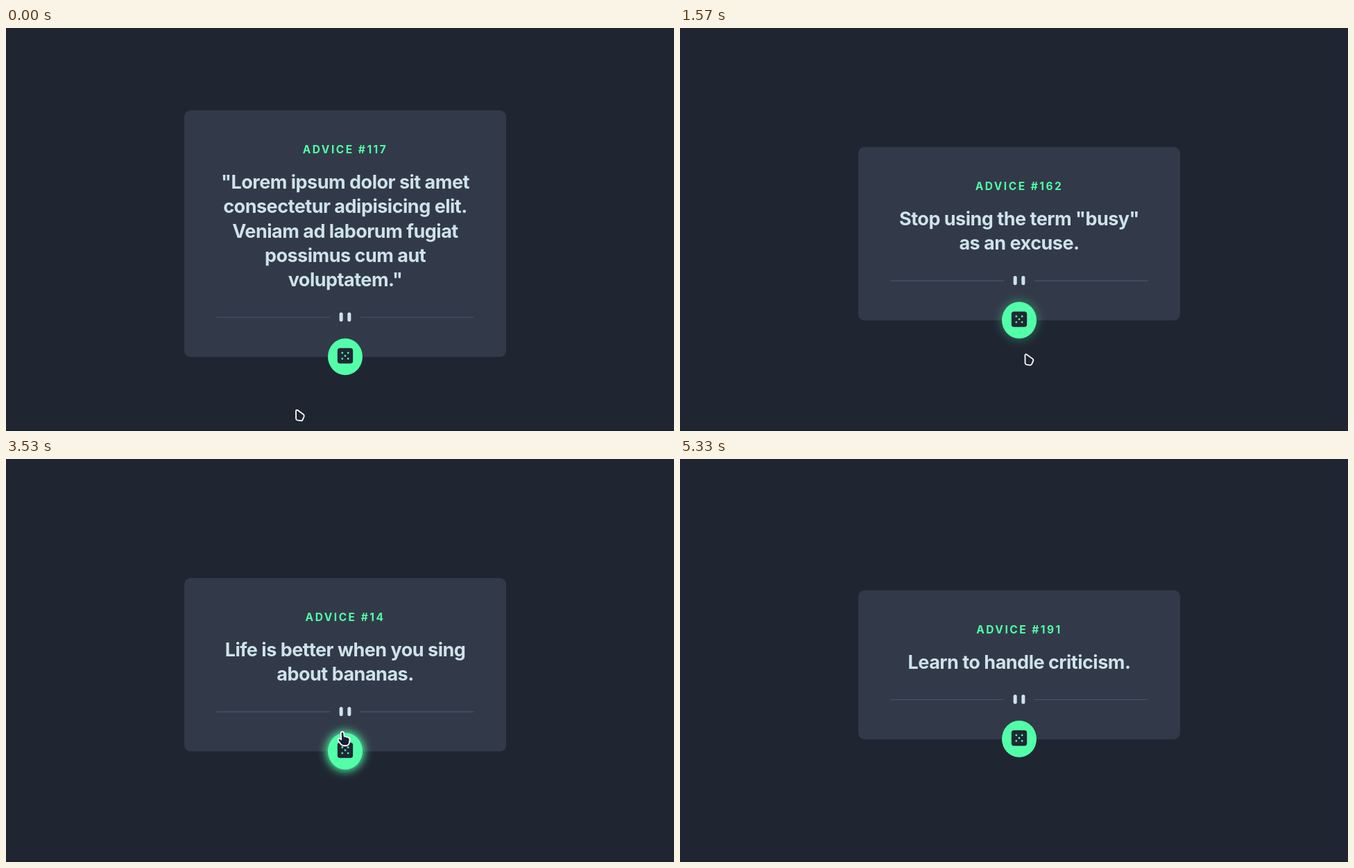
Animation of 963x582 px, one loop 5870 ms. Source, as an HTML page:

```html
<!DOCTYPE html>
<html lang="en">
<head>
<meta charset="utf-8">
<title>Advice generator</title>
<style>
  html, body { margin: 0; width: 100%; height: 100%; overflow: hidden; background: #1f2632; }
  svg { display: block; }
  text { font-family: Inter, sans-serif; font-weight: 700; text-anchor: middle; white-space: pre; }
  #title { font-size: 15.5px; letter-spacing: 2.5px; fill: #52ffa8; }
  #quote { font-size: 27px; letter-spacing: -.5px; fill: #cee3e9; }
  #glow { filter: blur(6.5px); }
  #cursor path { stroke: #fff; stroke-width: 1.8; stroke-linejoin: round; }
</style>
</head>
<body>
<svg width="963" height="582" viewBox="0 0 963 582">
  <rect y="580" width="963" height="2" fill="#1c222d"/>
  <rect id="card" x="257" width="464" rx="9" fill="#323a49"/>
  <g id="header">
    <text id="title" x="489" y="62.2"></text>
    <g id="quote"></g>
  </g>
  <!-- Positioned from the lower edge of the card -->
  <g id="footer">
    <g transform="translate(303.5 -64.4) scale(.8356)">
      <path fill="#4f5d74" d="M0 8h196v1H0zM248 8h196v1H248z"/>
      <g fill="#cee3e9">
        <rect x="212" width="6" height="16" rx="3"/>
        <rect x="226" width="6" height="16" rx="3"/>
      </g>
    </g>
    <g transform="translate(489 -.4)" fill="#52ffa8">
      <ellipse id="glow" rx="27" ry="28.5"/>
      <ellipse rx="25" ry="26.5"/>
      <g transform="translate(0 -1.3) scale(.93)">
        <rect x="-12" y="-12" width="24" height="24" rx="4" fill="#202733"/>
        <path fill="none" stroke="#52ffa8" stroke-width="3" stroke-linecap="round"
          d="M0 0h0M-4.5-4.5h0M4.5-4.5h0M-4.5 4.5h0M4.5 4.5h0"/>
      </g>
    </g>
  </g>
  <g id="cursor">
    <path id="arrow" fill="#1f2632" d="M1 2Q1.4 0 3.2 .8L11.8 7Q13.5 8.5 12.6 10.5L10.5 15Q9.8 16.4 8 16.2L3 15.4Q1.2 15 1.1 13.2Z"/>
    <path id="hand" fill="#172033" d="M-2.3 3.2a2.2 2.2 0 0 1 4.4-.3L2.6 7.4L8 8.8Q11 9.8 10.6 13L9.6 17.8Q8.5 21 5.5 21H2Q-1 21-2.6 18.5L-6 13.8Q-7.2 11.6-5.4 10.8Q-4 10.4-1.7 12.2Z"/>
  </g>
</svg>
<script>
const LOOP = 5870, STEP = 70, FADE = 200, FADE_SAMPLES = 10;
const LINE_HEIGHT = 35.2, CENTER_Y = 297.1;

const slides = [
  { from: 0, id: 117, lines: ['"Lorem ipsum dolor sit amet', 'consectetur adipisicing elit.',
    'Veniam ad laborum fugiat', 'possimus cum aut', 'voluptatem."'] },
  { from: 1430, id: 162, lines: ['Stop using the term "busy"', 'as an excuse.'] },
  { from: 2520, id: 59, lines: ['Don’t be afraid of silly ideas.'] },
  { from: 3530, id: 14, lines: ['Life is better when you sing', 'about bananas.'] },
  { from: 4630, id: 191, lines: ['Learn to handle criticism.'] },
];

const pointerStart = { x: 417, y: 551 };
const pointerMoves = [
  { from: 0, to: 560, x: 491, y: 472 },
  { from: 630, to: 960, x: 503, y: 457 },
  { from: 1150, to: 1360, x: 497, y: 475 },
  { from: 1430, to: 2190, x: 491, y: 426 },
  { from: 2720, to: 3070, x: 485, y: 393 },
  { from: 3530, to: 3800, x: 484, y: 384 },
  { from: 3800, to: 4300, x: 493, y: 419 },
  { from: 4700, to: 5330, x: 885, y: 590 },
];

const $ = id => document.getElementById(id);
const place = (id, x, y) => $(id).setAttribute('transform', `translate(${x} ${y})`);
const ease = k => k * k * (3 - 2 * k);
const slideAt = t => slides.findLast(s => s.from <= t);
const cardHeight = slide => 180 + slide.lines.length * LINE_HEIGHT;
let shown;

function showSlide(slide) {
  if (slide === shown) return;
  shown = slide;
  const height = cardHeight(slide), top = CENTER_Y - height / 2;
  $('card').setAttribute('y', top);
  $('card').setAttribute('height', height);
  place('header', 0, top);
  place('footer', 0, top + height);
  $('title').textContent = `ADVICE #${slide.id}`;
  $('quote').innerHTML = slide.lines.map((line, i) =>
    `<text x="489" y="${113.2 + i * LINE_HEIGHT}">${line}</text>`).join('');
}

function pointerAt(t) {
  let { x, y } = pointerStart;
  for (const move of pointerMoves.filter(m => m.from <= t)) {
    const elapsed = Math.floor((t - move.from) / STEP) * STEP;
    const k = t >= move.to ? 1 : ease(elapsed / (move.to - move.from));
    x += (move.x - x) * k;
    y += (move.y - y) * k;
  }
  return { x, y };
}

function hoverAt(t) {
  const time = Math.max(0, t), { x, y } = pointerAt(time);
  const buttonY = CENTER_Y + cardHeight(slideAt(time)) / 2 - .4;
  return Math.hypot((x - 489) / 25, (y - buttonY) / 26.5) < 1;
}

// The fade is the share of the last FADE ms spent over the button.
function glowAt(t) {
  let hits = 0;
  for (let i = 1; i <= FADE_SAMPLES; i++) hits += hoverAt(t - i * FADE / FADE_SAMPLES);
  return hits / FADE_SAMPLES;
}

function draw(now) {
  const t = now % LOOP, pointer = pointerAt(t);
  const hovering = hoverAt(t - STEP);
  showSlide(slideAt(t));
  $('glow').setAttribute('opacity', glowAt(t));
  place('cursor', pointer.x, pointer.y);
  $('hand').style.display = hovering ? '' : 'none';
  $('arrow').style.display = hovering ? 'none' : '';
  requestAnimationFrame(draw);
}
draw(performance.now());
</script>
</body>
</html>
```
